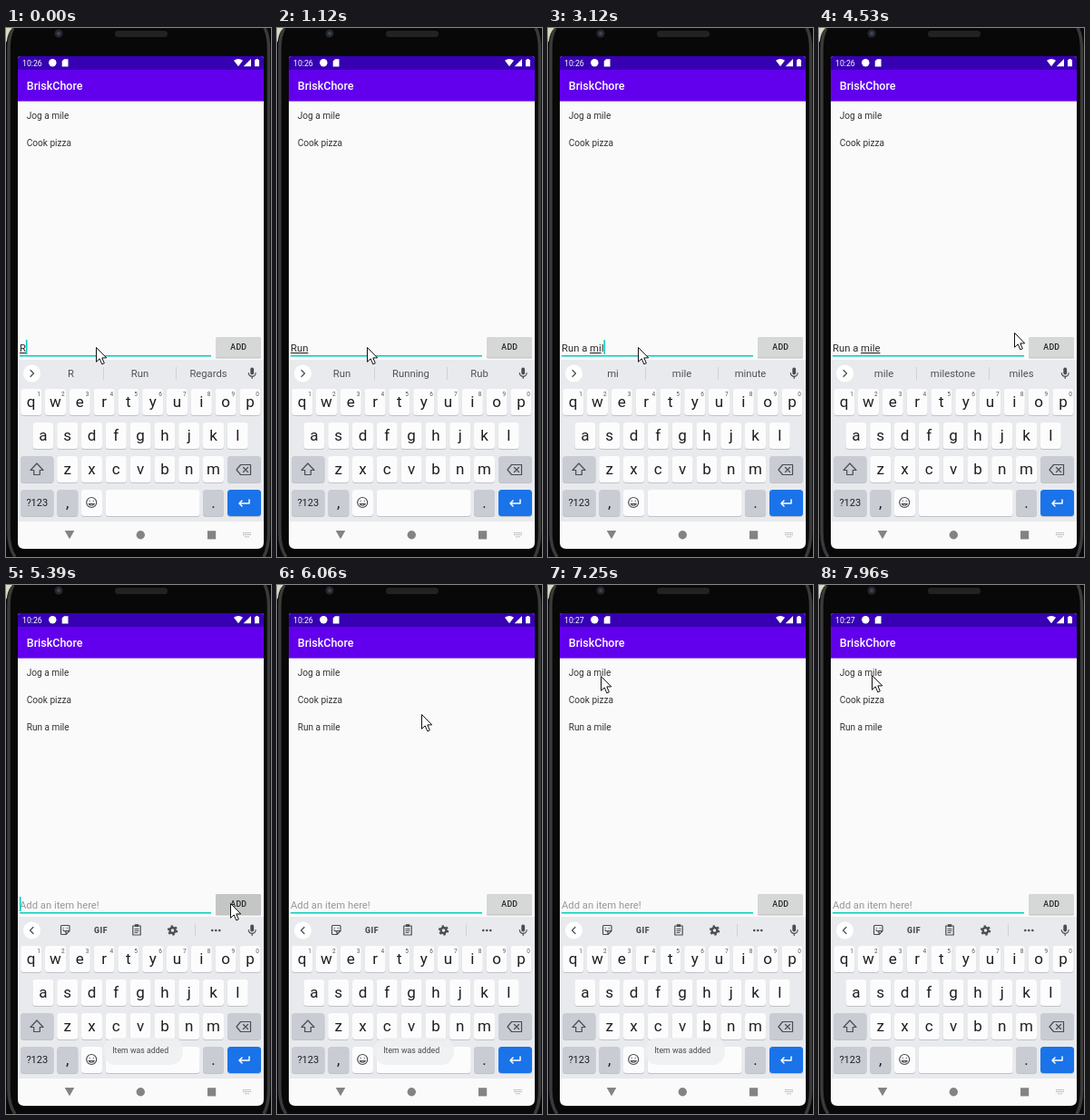
An HTML page for the animation above (8 s loop, 292 by 582 pixels).

```html
<!DOCTYPE html>
<html lang="en">
<head>
<meta charset="utf-8">
<title>Todo app</title>
<style>
html, body { margin: 0; width: 100%; height: 100%; overflow: hidden; background: #080808; }
svg { display: block; width: 292px; height: 582px; }
text { font-family: Roboto, sans-serif; white-space: pre; }
.mid { text-anchor: middle; }
.item { font-size: 10.1px; fill: #333; }
.edit { font-size: 11.25px; fill: #2c2c2c; }
.tip { font-size: 11.25px; fill: #4f5257; text-anchor: middle; }
.key { font-size: 17px; fill: #1d1e20; text-anchor: middle; }
.hint { font-size: 6.5px; fill: #55585c; text-anchor: middle; }
.line { fill: none; stroke: #4a4d51; stroke-width: 1.2; stroke-linejoin: round; stroke-linecap: round; }
.dark { fill: #4a4d51; }
.u { text-decoration: underline; text-decoration-thickness: 1px; text-underline-offset: 0; }
</style>
</head>
<body>
<svg viewBox="0 0 292 582">
  <defs>
    <clipPath id="screen"><path d="M13 34Q13 31 16 31H281Q284 31 284 34V566Q284 573 277 573H20Q13 573 13 566Z"/></clipPath>
  </defs>

  <!-- phone body -->
  <rect width="292" height="582" fill="#080808"/>
  <path d="M8 0Q3 8 3 24V555Q3 572 10 582M285 0Q289.500 8 289.500 24V555Q289.500 572 284 582" fill="none" stroke="#3a3a3a" stroke-width="3.500"/>
  <path d="M0 0H7Q2 5 1 14L0 16Z" fill="#dedabf"/>
  <circle cx="58" cy="6" r="4.500" fill="#25272b"/>
  <circle cx="58" cy="6" r="2" fill="#3c4658"/>
  <rect x="120" y="3" width="58" height="7" rx="3.500" fill="#222"/>

  <g clip-path="url(#screen)">
    <rect x="13" y="31" width="271" height="542" fill="#fafafa"/>
    <rect x="13" y="31" width="271" height="15" fill="#3700b3"/>
    <rect x="13" y="46" width="271" height="34.600" fill="#6200ee"/>
    <g fill="#fff">
      <text id="clock" x="18" y="41.700" font-size="8.750">10:26</text>
      <circle cx="51.300" cy="38.300" r="4.200"/>
      <path d="M64 34.200H68.500V42.500H61.700V36.500Z"/>
      <path d="M251 35.800Q256 32.200 261 35.800L256 42.300Z"/>
      <path d="M270 34V42.300H261.700Z"/>
      <path d="M274 35H275.300V34H277.700V35H279V42.300H274Z"/>
      <text x="22.800" y="68" font-size="12.500" font-weight="500">BriskChore</text>
    </g>

    <text class="item" x="22.700" y="100">Jog a mile</text>
    <text class="item" x="22.700" y="130">Cook pizza</text>
    <text class="item" id="added" x="22.700" y="160">Run a mile</text>

    <text class="edit" id="edit" x="15" y="356"><tspan></tspan><tspan class="u"></tspan><tspan></tspan></text>
    <text class="edit" id="hint" x="15" y="356" style="fill:#979797">Add an item here!</text>
    <rect x="15" y="360" width="211" height="1.500" fill="#03cdbd"/>
    <rect id="caret" y="343" width="1.500" height="16" fill="#03cdbd"/>
    <rect x="231" y="340.500" width="50" height="23" rx="1.500" fill="#bcbcbc"/>
    <rect id="button" x="231" y="340" width="50" height="22.500" rx="1.500" fill="#d6d7d7"/>
    <text class="mid" x="256.300" y="354" font-size="8.750" font-weight="500" letter-spacing=".2" fill="#222">ADD</text>

    <!-- keyboard -->
    <rect x="13" y="365" width="271" height="178" fill="#e8eaed"/>
    <circle cx="28.500" cy="380" r="9.500" fill="#fff"/>
    <path class="dark" d="M269.300 375.500a1.900 1.900 0 0 1 3.800 0v4a1.900 1.900 0 0 1-3.800 0Z"/>
    <path class="line" d="M267.300 379.500a3.900 3.900 0 0 0 7.800 0M271.200 383.500V385.500"/>
    <g id="tips">
      <path class="line" d="M27 376.500L30.500 380L27 383.500"/>
      <path d="M107.500 373V387M187.500 373V387" stroke="#cfd2d6"/>
      <text class="tip" x="71.500" y="384"></text>
      <text class="tip" x="147.500" y="384"></text>
      <text class="tip" x="223" y="384"></text>
    </g>
    <g id="tools">
      <path class="line" d="M30 376.500L26.500 380L30 383.500"/>
      <path class="line" d="M61.500 374.500H69Q70 374.500 70 375.500V380.500L66 384.500H61.500Q60.500 384.500 60.500 383.500V375.500Q60.500 374.500 61.500 374.500M70 380.500H66V384.500M63 379.500Q64 381.500 66 380.500M63.200 377.500H63.300M67.200 377.500H67.300"/>
      <text class="mid dark" x="104.500" y="382.800" font-size="8.750" font-weight="900" letter-spacing=".6">GIF</text>
      <path class="line" d="M139.800 375H148.200V385H139.800ZM142 378.500H146M142 380.500H146M142 382.500H145"/>
      <rect class="dark" x="141.800" y="373.200" width="4.400" height="3"/>
      <circle cx="183.500" cy="380" r="4.700" fill="none" stroke="#4a4d51" stroke-width="2" stroke-dasharray="2.300 2.620"/>
      <circle cx="183.500" cy="380" r="3" fill="none" stroke="#4a4d51" stroke-width="2.400"/>
      <path d="M208.500 373V387" stroke="#cfd2d6"/>
      <g class="dark"><circle cx="227.300" cy="380" r="1.300"/><circle cx="231.300" cy="380" r="1.300"/><circle cx="235.300" cy="380" r="1.300"/></g>
    </g>
    <g id="keys"></g>
    <path class="line" d="M34 479L41 486.500H37.300V491.500H30.700V486.500H27Z"/>
    <path class="line" d="M258.500 480.500H269.500V491.500H258.500L254 486ZM261.500 483.500L266.500 488.500M266.500 483.500L261.500 488.500"/>
    <circle class="line" cx="94.200" cy="522" r="5.500"/>
    <path class="line" d="M91.200 523.500Q94.200 527 97.200 523.500ZM92.200 520.300H92.300M96.200 520.300H96.300"/>
    <path class="line" d="M268 519V523H257M260 520L257 523L260 526" style="stroke:#fff;stroke-width:1.500"/>

    <!-- navigation bar -->
    <g fill="#838383">
      <path d="M64.700 553H75.300L70 562.300Z"/>
      <circle cx="148.300" cy="557.800" r="4.700"/>
      <rect x="222" y="553.200" width="9.200" height="9.200"/>
    </g>
    <path d="M261 555.500H270M261 557.500H270M263 559.800H268" stroke="#a5a5a5" stroke-dasharray="1.200 .7"/>

    <g id="toast">
      <rect x="107" y="498" width="88" height="30" rx="14" fill="#eff0f1" opacity=".85"/>
      <text class="mid" x="148.200" y="515" font-size="8.750" fill="#4a4a4a">Item was added</text>
    </g>
  </g>
  <path id="pointer" d="M.5 .5V16.300L4.200 12.900L6.800 18.900L9.300 17.800L6.800 11.900H11.700Z" fill="#fff" stroke="#111" stroke-linejoin="round"/>
</svg>
<script>
const LOOP = 8000;
const $ = id => document.getElementById(id);

function add(tag, attrs, text = '') {
  const el = document.createElementNS('http://www.w3.org/2000/svg', tag);
  for (const name in attrs) el.setAttribute(name, attrs[name]);
  el.textContent = text;
  $('keys').append(el);
}

function key(x, y, width, label, fill = '#fcfcfd', size = 17) {
  add('rect', { x, y: y + 1, width, height: 29, rx: 3.5, fill: '#bfc2c7' });
  add('rect', { x, y, width, height: 29, rx: 3.5, fill });
  add('text', { class: 'key', x: x + width / 2, y: y + 14.5 + size * .33, style: `font-size:${size}px` }, label);
}

function row(letters, x, y) {
  [...letters].forEach((c, i) => key(x + i * 26.8, y, 23, c));
}

const GREY = '#c9ccd3';
row('qwertyuiop', 16.2, 397);
[...'1234567890'].forEach((c, i) => add('text', { class: 'hint', x: 36 + i * 26.8, y: 404.7 }, c));
row('asdfghjkl', 29.4, 434);
row('zxcvbnm', 56.2, 471);
key(16, 471, 36.5, '', GREY);
key(244, 471, 37, '', GREY);
key(16, 508, 36.5, '?123', GREY, 11);
key(56.3, 508, 23, ',', GREY);
key(83, 508, 23, '');
key(109.7, 508, 104, '');
key(217, 508, 23, '.', GREY);
key(244, 508, 37, '', '#1a73e8');

// time, typed text, underlined from, underlined to, suggestions
const typing = [
  [0, 'R', 0, 1, 'R Run Regards'],
  [130, 'Ru', 0, 1, 'R Run Regards'],
  [270, 'Ru', 0, 2, 'Ru Run Rub'],
  [410, 'Run', 0, 2, 'Ru Run Rub'],
  [710, 'Run', 0, 3, 'Run Running Rub'],
  [1540, 'Run ', 0, 0, 'Run Running Rub'],
  [1680, 'Run ', 0, 0, 'the to a'],
  [1820, 'Run a', 4, 5, 'a and at'],
  [1970, 'Run a ', 4, 5, 'a and at'],
  [2250, 'Run a ', 0, 0, 'few little lot'],
  [2680, 'Run a m', 0, 0, 'few little lot'],
  [2820, 'Run a m', 6, 7, 'm mile minute'],
  [2970, 'Run a mi', 6, 8, 'mi mile minute'],
  [3120, 'Run a mil', 6, 8, 'mi mile minute'],
  [3420, 'Run a mile', 6, 9, 'mil mile miles'],
  [3700, 'Run a mile', 6, 10, 'mile milestone miles'],
  [5250, '', 0, 0, '']
];

// time, x, y
const moves = [
  [0, 99, 351], [4130, 112, 346], [4270, 150, 336], [4400, 188, 331], [4530, 215, 335],
  [4670, 235, 344], [4810, 247, 350], [5530, 244, 335], [5660, 227, 285], [5800, 200, 215],
  [5930, 172, 160], [6060, 159, 142], [6200, 150, 142], [6340, 128, 135], [6480, 102, 122],
  [6610, 78, 110], [6750, 62, 102], [6880, 58, 100], [7390, 58, 99]
];

// times at which the caret turns on, off, on ...
const blinks = [0, 1120, 1540, 4130, 4670, 5110, 5390, 5930, 6340, 6880, 7390, 7820];

const latest = (list, t) => list.findLast(entry => entry[0] <= t);
const show = (id, on) => { $(id).style.display = on ? '' : 'none'; };

const parts = $('edit').children;
const tips = $('tips').querySelectorAll('text');

function draw(t) {
  const [, text, from, to, words] = latest(typing, t);
  [text.slice(0, from), text.slice(from, to), text.slice(to)].forEach((s, i) => {
    if (parts[i].textContent !== s) parts[i].textContent = s;
  });
  words.split(' ').forEach((w, i) => { tips[i].textContent = w; });
  show('tips', text);
  show('tools', !text);
  show('hint', !text);
  show('added', !text);

  $('caret').setAttribute('x', 15 + (text ? $('edit').getComputedTextLength() : 0));
  show('caret', blinks.filter(b => b <= t).length % 2);

  const [, x, y] = latest(moves, t);
  $('pointer').setAttribute('transform', `translate(${x} ${y})`);
  $('button').setAttribute('fill', t >= 5110 && t < 5530 ? '#c4c5c5' : '#d6d7d7');
  $('clock').textContent = t < 6610 ? '10:26' : '10:27';
  show('toast', t >= 5390 && t < 7530);
}

const start = performance.now();
function frame() {
  draw((performance.now() - start) % LOOP);
  requestAnimationFrame(frame);
}
frame();
</script>
</body>
</html>
```
